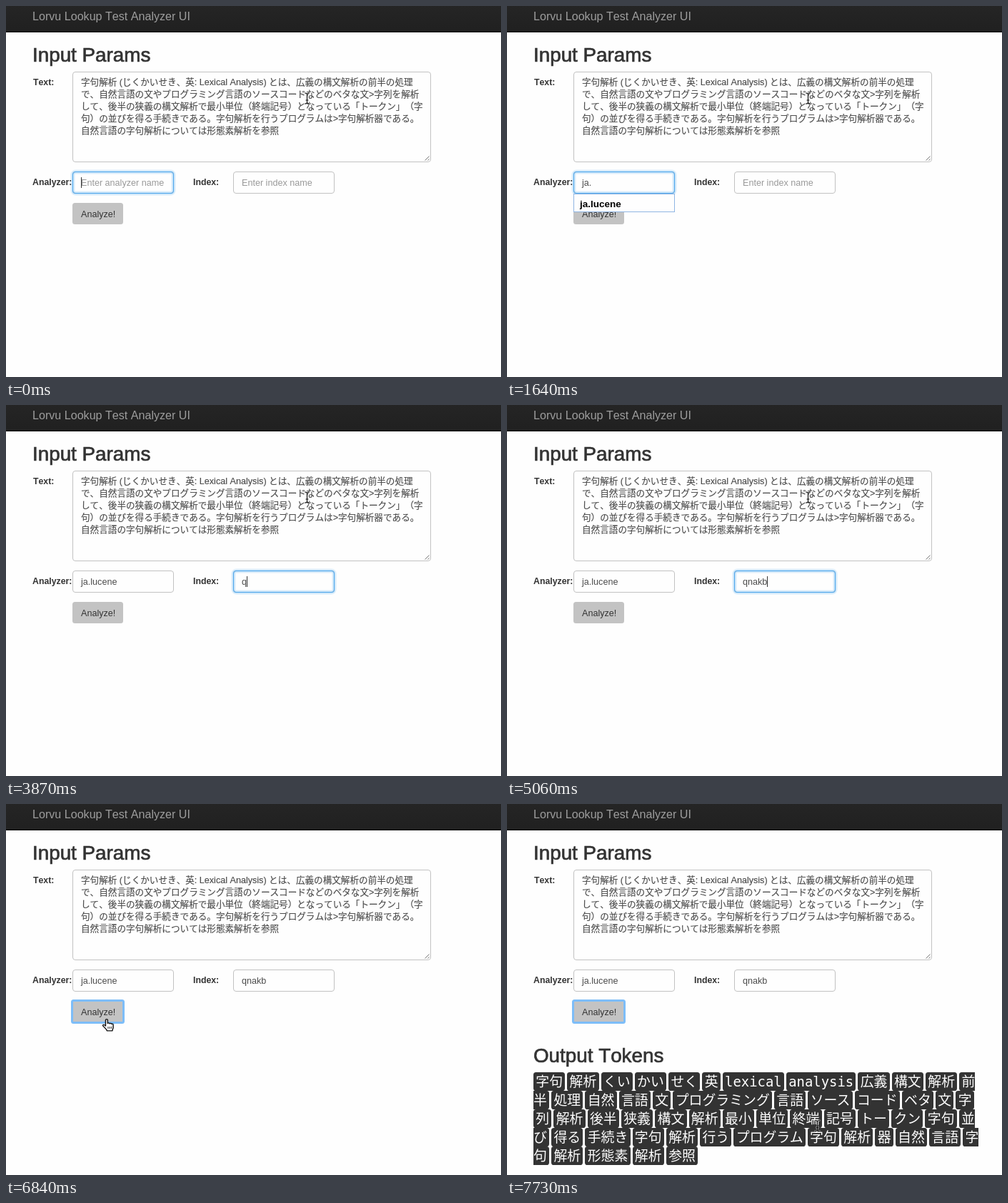
Animation of 693 by 520 pixels, one loop 8 s. Source, as an HTML page:

```html
<!DOCTYPE html>
<html lang="ja">
<head>
<meta charset="utf-8">
<title>Analyzer form</title>
<style>
html, body { margin: 0; width: 100%; height: 100%; overflow: hidden; background: #fefefe; text-spacing-trim: space-all; }
svg { position: absolute; left: 0; top: 0; }
text {
  font: 12.6px "Liberation Sans", "Noto Sans CJK JP", "Noto Sans CJK", sans-serif;
  font-kerning: none; fill: #4c4c4c; white-space: pre;
}
#prose text { font-weight: 500; stroke: #4c4c4c; stroke-width: .15; }
.brand { font-size: 16.1px; fill: #9d9d9d; }
.head { font-size: 27.8px; fill: #333; stroke: #333; stroke-width: .7; }
.label { font-size: 12.3px; font-weight: bold; fill: #333; }
.hint { fill: #999; }
.field { fill: #fefefe; stroke: #c2c2c2; }
.glow { fill: none; stroke: #52a8ec; }
#tokens {
  position: absolute; left: 37px; top: 376px; white-space: nowrap; color: #fff;
  font: 500 18.9px/26px "DejaVu Sans Mono", "Noto Sans CJK JP", "Noto Sans CJK", monospace;
}
#tokens span { background: #333; border-radius: 3.6px; padding: 2px 3.25px; margin-right: 3px; }
</style>
</head>
<body>
<svg width="693" height="520">
  <defs>
    <linearGradient id="bar" x2="0" y2="1"><stop stop-color="#252525"/><stop offset="1" stop-color="#202020"/></linearGradient>
  </defs>
  <rect width="693" height="37" fill="url(#bar)"/>
  <rect y="36" width="693" height="1" fill="#090909"/>
  <text class="brand" x="37" y="20">Lorvu Lookup Test Analyzer UI</text>
  <text class="head" x="37" y="78">Input Params</text>
  <text class="label" x="38" y="111">Text:</text>
  <text class="label" x="37" y="251">Analyzer:</text>
  <text class="label" x="262" y="251">Index:</text>

  <rect class="field" x="93.5" y="92.5" width="501" height="126" rx="3.5"/>
  <path d="M586.5 216.5l6-6M590.5 216.5l2-2" stroke="#777" fill="none"/>
  <g id="prose"></g>

  <rect class="field" x="93.5" y="232.5" width="141" height="30" rx="3.5"/>
  <rect class="field" x="318.5" y="232.5" width="141" height="30" rx="3.5"/>
  <g id="focus" class="glow">
    <rect x=".5" y=".5" width="141" height="30" rx="4" stroke-width="6.5" opacity=".12"/>
    <rect x=".5" y=".5" width="141" height="30" rx="4" stroke-width="4" opacity=".22"/>
    <rect x=".5" y=".5" width="141" height="30" rx="3.5"/>
  </g>
  <text id="analyzer" x="105" y="252"></text>
  <text id="index" x="330" y="252"></text>
  <rect id="caret" y="240" width="1" height="15" fill="#333"/>

  <rect x="93" y="276" width="71" height="30" rx="3.5" fill="#c3c3c3"/>
  <text x="105" y="296" style="fill:#333">Analyze!</text>
  <rect id="ring" x="92.5" y="275.5" width="72" height="31" rx="2" fill="none" stroke="#7dbdf8" stroke-width="3"/>
  <g id="menu">
    <rect x="93.5" y="263.5" width="141" height="25" fill="#fefefe" stroke="#8fb5e3"/>
    <text x="102" y="282" style="font-size:13.5px;font-weight:bold;fill:#000">ja.lucene</text>
  </g>
  <text id="result" class="head" x="37" y="362">Output Tokens</text>
</svg>
<div id="tokens"></div>
<svg width="693" height="520">
  <defs>
    <path id="bar-shape" d="M-3-7.5Q0-7.5 0-5.5Q0-7.5 3-7.5M0-5.5V5.5M-3 7.5Q0 7.5 0 5.5Q0 7.5 3 7.5M-1.5 2.5H1.5"/>
  </defs>
  <g id="beam" fill="none" stroke-linecap="round">
    <use href="#bar-shape" stroke="#fff" stroke-opacity=".55" stroke-width="2.4"/>
    <use href="#bar-shape" stroke="#111" stroke-width="1.2"/>
  </g>
  <g id="hand" stroke="#111" stroke-linejoin="round">
    <g transform="scale(1.12 1)">
      <path d="M-.5 9V1.2c0-2 2.6-2 2.6 0V5.5c.5-1 2.3-.9 2.5.4 .6-.9 2.2-.7 2.4.5 .8-.6 2-.3 2 1V11c0 2-1 2.6-1 4.8H1.3C1 13.6-2 11.6-3.8 8.8-4.4 7.2-2.5 6.6-.5 9Z" fill="#fff" stroke-width="1.3"/>
      <path d="M2.6 10v3M4.6 10v3M6.6 10v3" stroke-width=".8"/>
    </g>
  </g>
</svg>
<script>
const LOOP = 8000;
const $ = id => document.getElementById(id);

const prose = [
  "字句解析 (じくかいせき、英: Lexical Analysis) とは、広義の構文解析の前半の処理",
  "で、自然言語の文やプログラミング言語のソースコードなどのベタな文>字列を解析",
  "して、後半の狭義の構文解析で最小単位（終端記号）となっている「トークン」（字",
  "句）の並びを得る手続きである。字句解析を行うプログラムは>字句解析器である。",
  "自然言語の字句解析については形態素解析を参照"
];
prose.forEach((line, i) => {
  const el = document.createElementNS("http://www.w3.org/2000/svg", "text");
  el.setAttribute("x", 105);
  el.setAttribute("y", 110.6 + 17 * i);
  el.textContent = line;
  $("prose").append(el);
});

// "|" breaks a row inside a token, "/" between two tokens
const tokens = "字句 解析 くい かい せく 英 lexical analysis 広義 構文 解析 前|半 処理 自然 言語 文 " +
  "プログラミング 言語 ソース コード ベタ 文 字 / 列 解析 後半 狭義 構文 解析 最小 単位 終端 記号 " +
  "トー クン 字句 並|び 得る 手続き 字句 解析 行う プログラム 字句 解析 器 自然 言語 字|句 解析 形態素 解析 参照";
$("tokens").innerHTML = tokens.split(" ")
  .map(t => t === "/" ? "<br>" : `<span>${t.replace("|", "<br>")}</span>`).join("");

// [time, number of typed characters]
const analyzerKeys = [[0, 0], [740, 1], [890, 2], [1190, 3], [1790, 4], [2080, 5], [2380, 6], [2670, 7], [2820, 9]];
const indexKeys = [[0, 0], [3870, 1], [4160, 2], [4310, 3], [4760, 4], [5060, 5]];
const caretOff = [[290, 740], [1640, 1790], [3720, 3870], [5510, 6100], [6540, LOOP]];
// [time, x, y, shape]
const pointer = [
  [0, 421.5, 129.5, "beam"], [5810, 395, 150, "beam"], [5960, 245, 222, "beam"], [6100, 171.5, 249.5, "beam"],
  [6250, 150, 280, "hand"], [6400, 143, 298, "hand"], [6540, 140, 302, "hand"],
  [7580, 310, 395, "beam"], [7730, 434.5, 451, "beam"]
];

const at = (keys, t) => keys.findLast(k => k[0] <= t);
const show = (id, on) => $(id).style.display = on ? "" : "none";
const move = (id, x, y) => $(id).setAttribute("transform", `translate(${x} ${y})`);

function fill(id, word, count, hint) {
  const el = $(id);
  el.textContent = count ? word.slice(0, count) : hint;
  el.setAttribute("class", count ? "" : "hint");
  return +el.getAttribute("x") + (count ? el.getComputedTextLength() : 0);
}

function draw(t) {
  const ends = [
    fill("analyzer", "ja.lucene", at(analyzerKeys, t)[1], "Enter analyzer name"),
    fill("index", "qnakb", at(indexKeys, t)[1], "Enter index name")
  ];
  const active = t < 3120 ? 0 : 1;
  const typing = t < 6840;
  move("focus", active ? 318 : 93, 232);
  show("focus", typing);
  $("caret").setAttribute("x", Math.round(ends[active]));
  show("caret", typing && !caretOff.some(([a, b]) => t >= a && t < b));
  show("menu", t >= 890 && t < 3120);
  show("ring", !typing);
  show("result", t >= 6990);
  show("tokens", t >= 6990);

  const [, x, y, shape] = at(pointer, t);
  show("beam", shape === "beam");
  show("hand", shape === "hand");
  move(shape, x, y);
}

const start = performance.now();
function tick() {
  draw((performance.now() - start) % LOOP);
  requestAnimationFrame(tick);
}
tick();
</script>
</body>
</html>
```
